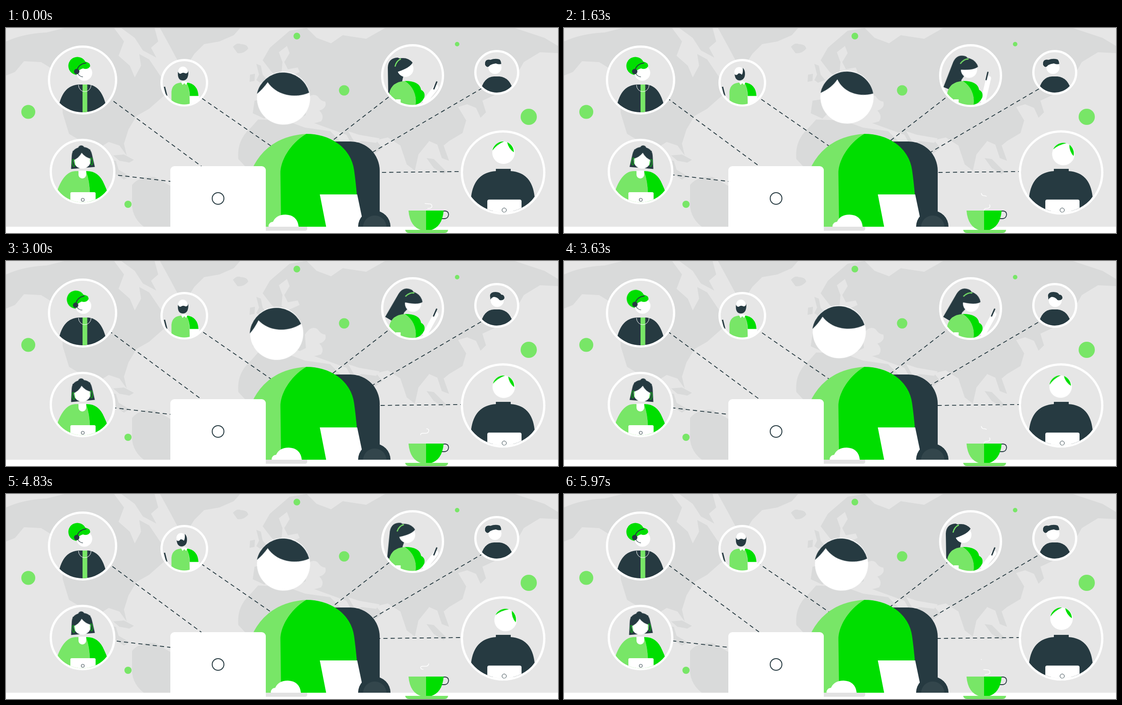
Recreate the animation shown at these times as an HTML page. Size 1226 by 457 pixels, loop 6010 ms.

```html
<!DOCTYPE html>
<html lang="en">
<head>
<meta charset="utf-8">
<title>Remote team</title>
<style>
html, body { margin: 0; width: 100%; height: 100%; overflow: hidden; background: #e6e6e6; }
svg { display: block; width: 100vw; height: 100vh; }
.dark { fill: #263a41; }
.green { fill: #00de00; }
.light { fill: #78e667; }
.white { fill: #fff; }
.land { fill: #d9dada; }
.sea { fill: #e6e6e6; }
.line { fill: none; stroke: #263a41; }
.disc { fill: #e6e6e6; stroke: #fff; stroke-width: 5; }

.anim, .links path, .steam { animation: 6.01s ease-in-out infinite; }

.links path {
  fill: none; stroke: #263a41; stroke-width: 1.8;
  stroke-dasharray: 9.3 6.8;
  animation-name: flow; animation-timing-function: linear;
}
@keyframes flow {
  from { stroke-dashoffset: var(--o); }
  to { stroke-dashoffset: calc(var(--o) - 284.3px); }
}
.steam {
  fill: none; stroke: #fff; stroke-width: 1.5;
  stroke-dasharray: 31 51;
  animation-name: rise; animation-duration: 2.00333s; animation-timing-function: linear;
}
@keyframes rise {
  from { stroke-dashoffset: -6px; }
  to { stroke-dashoffset: -88px; }
}

.boss { transform-origin: 640px 251px; animation-name: boss; }
@keyframes boss {
  0%, 4.2%, 64%, 100% { transform: rotate(-14deg); }
  12.5%, 22.5% { transform: rotate(0deg); }
  35%, 55% { transform: rotate(-23.4deg); }
}
.bossHair { animation-name: bossHair; }
@keyframes bossHair {
  0%, 4.2%, 35%, 100% { d: path("M585 130A59.5 59.5 0 0 1 698.2 155.2C668 161 628 147 614.5 110.6Q600 123 585 130Z"); }
  12.5%, 22.5% { d: path("M582 140A59.5 59.5 0 0 1 699 151C668 156 636 142 627 112Q612 132 582 140Z"); }
}
.hand { animation-name: hand; }
@keyframes hand {
  0%, 3%, 92%, 100% { transform: translate(0, 0); }
  12.5%, 24% { transform: translate(15px, 0); }
  34%, 65% { transform: translate(7px, 0); }
  75%, 82% { transform: translate(5px, 0); }
}

.agent { transform-origin: 175px 128px; animation-name: agent; }
@keyframes agent {
  0%, 2%, 21%, 32%, 71%, 85%, 94%, 100% { transform: rotate(0deg); }
  9%, 14.5% { transform: rotate(-4deg); }
  39%, 51.5% { transform: rotate(-4.5deg); }
  58%, 64% { transform: rotate(1deg); }
  89.5% { transform: rotate(-4deg); }
}
.bob { transform-origin: 171.5px 318px; animation-name: bob; }
@keyframes bob {
  0%, 5%, 76.5%, 100% { transform: rotate(-5deg); }
  12.5%, 29% { transform: rotate(5deg); }
  37.5%, 48% { transform: rotate(-6.5deg); }
  56.5%, 68% { transform: rotate(5deg); }
}

.skull { animation-name: skull; }
@keyframes skull {
  0%, 19%, 51.5%, 68%, 93%, 100% { transform: translate(0, 0); }
  25%, 45%, 75%, 86.5% { transform: translate(-4px, 1px); }
}
.beard { animation-name: beard; }
@keyframes beard {
  0%, 19%, 51.5%, 68%, 93%, 100% {
    d: path("M382 97Q380 117 393 117Q406 117 405 95Q404 102 398 101Q393 98 388 102Q383 102 382 97Z");
  }
  25%, 45%, 75%, 86.5% {
    d: path("M379 103Q380 117 391 117Q402 115 402 102Q402 93 397 89Q398 100 395 104Q388 98 385 104Q381 106 379 103Z");
  }
}

.caller { transform-origin: 888px 124px; animation-name: caller; }
@keyframes caller {
  0%, 1.7%, 88.2%, 100% { transform: rotate(0deg); }
  13.3%, 26.6% { transform: rotate(22deg); }
  31.6% { transform: rotate(29deg); }
  39% { transform: rotate(25deg); }
  42.6%, 64% { transform: rotate(31deg); }
}
.phone { transform-origin: 953.5px 128px; animation-name: phone; }
@keyframes phone {
  0%, 2%, 78%, 100% { transform: translate(0, 0) rotate(22deg); }
  12.5%, 27% { transform: translate(-14px, -21px) rotate(13deg); }
  38% { transform: translate(-12.5px, -20.5px) rotate(15deg); }
  48%, 65% { transform: translate(-.5px, -13px) rotate(24deg); }
}
.arm { fill: none; stroke: #fff; stroke-width: 11; stroke-linecap: round; animation-name: arm; }
@keyframes arm {
  0%, 2%, 78%, 100% { d: path("M931 163L955 132"); }
  12.5%, 38% { d: path("M931 163L943 112"); }
  48%, 65% { d: path("M931 163L955 119"); }
}

.buddy { animation-name: buddy; }
@keyframes buddy {
  0%, 11.6%, 26.6%, 36.6%, 71.5%, 100% { transform: translate(0, 0); }
  17.5%, 21.6%, 48%, 61.5% { transform: translate(5px, 0); }
}
.quiff { animation-name: quiff; }
@keyframes quiff {
  0%, 11.6%, 26.6%, 36.6%, 71.5%, 100% {
    d: path("M1064 77Q1066 69 1076 71Q1086 67 1096 70Q1099 72 1100 80Q1094 82 1088 79Q1080 80 1075 83Q1069 91 1064 82Z");
  }
  17.5%, 21.6%, 48%, 61.5% {
    d: path("M1075 77Q1076 69 1087 69Q1097 69 1100 75Q1107 75 1107 83Q1104 89 1096 87Q1091 80 1083 80Q1078 82 1076 86Z");
  }
}

.senior { transform-origin: 1105px 278px; animation-name: senior; }
@keyframes senior {
  0%, 1%, 94%, 100% { transform: translate(0, 0) rotate(0deg); }
  10%, 21.6% { transform: translate(-9px, 4px) rotate(-11deg); }
  28.3%, 43% { transform: translate(5px, 3px) rotate(15deg); }
  55%, 64% { transform: translate(-2px, 2px) rotate(-2deg); }
  72.4%, 74.5% { transform: translate(8px, 3px) rotate(18deg); }
  81% { transform: translate(4.5px, 3px) rotate(15deg); }
}
</style>
</head>
<body>
<svg viewBox="0 0 1226 457" preserveAspectRatio="none">
  <defs>
    <clipPath id="c1"><circle cx="170" cy="116" r="72"/></clipPath>
    <clipPath id="c2"><circle cx="396" cy="122" r="48.5"/></clipPath>
    <clipPath id="c3"><circle cx="903" cy="106" r="65.5"/></clipPath>
    <clipPath id="c4"><circle cx="1090" cy="99" r="45"/></clipPath>
    <clipPath id="c5"><circle cx="170" cy="320" r="68.5"/></clipPath>
    <clipPath id="c6"><circle cx="1104" cy="322" r="89"/></clipPath>
  </defs>
  <rect class="sea" width="1226" height="457"/>

  <!-- world map -->
  <g class="land">
    <path d="M0 30Q40 12 90 10L130 0H240L262 30L250 62L275 84L286 110L300 84L296 58L318 70L345 110L352 150L318 180L290 196L272 226L262 258L268 284L252 262L228 254L206 268L214 294L244 296L250 316L274 330L262 338L226 314L186 290L160 248L140 236L126 190L124 140L104 92L78 76L40 74L20 98L0 106Z"/>
    <path d="M256 0H330L338 30L322 44L334 66L304 50L286 22Z"/>
    <path d="M342 0H520L506 16L474 30L440 36L418 58L402 84L384 78L366 44Z"/>
    <path d="M504 42Q512 32 522 36Q536 36 538 46Q528 58 514 56Z"/>
    <path d="M556 80L566 84L570 104L580 116L564 122L556 116L562 104ZM542 104L553 102L552 118L541 120Z"/>
    <path d="M280 350Q296 330 330 332L372 356V443H306Q276 420 280 380Z"/>
    <path d="M516 292Q512 250 544 222L560 204L620 206L664 222L720 230L752 262L790 290L770 330L740 443H640L610 330L540 318Z"/>
    <path d="M548 190L552 162L578 158L570 136L596 126L606 112L590 98L570 72L586 44L630 6L668 0L690 22L722 34L748 16L800 24L842 0H1130L1196 22L1226 40V56L1186 54L1150 76L1132 108L1108 132L1084 150L1058 162L1066 188L1054 200L1044 178L1024 170L1004 176L1022 206L1014 234L984 252L972 262L984 296L968 290L958 260L940 252L916 282L908 318L890 304L876 262L848 244L822 250L836 268L806 290L782 284L756 238L712 222L690 214L640 196L616 176L592 184L574 202Z"/>
    <path d="M934 290L950 292L978 320L972 326L950 312ZM1030 270L1042 278L1040 300L1028 290ZM238 284L262 282L284 294L274 300L252 296Z"/>
  </g>
  <g class="sea">
    <path d="M606 54L624 40L630 56L618 76L626 92L648 88L652 98L626 110L612 100L614 76Z"/>
    <path d="M664 164Q678 142 692 152Q700 164 709 164Q714 178 696 184Q708 196 700 208Q676 216 652 214L642 206L666 194Z"/>
    <path d="M760 230L784 238L830 246L822 256L790 252L776 258Z"/>
  </g>

  <g class="light">
    <circle cx="49.500" cy="187" r="15.500"/>
    <circle cx="271" cy="393" r="8"/>
    <circle cx="646" cy="18" r="7.500"/>
    <circle cx="751" cy="139" r="11.500"/>
    <circle cx="1002" cy="36" r="5"/>
    <circle cx="1161" cy="198" r="18"/>
  </g>

  <g class="links">
    <path style="--o:-9.7px" d="M435 309L233 159"/>
    <path style="--o:-1.5px" d="M590 264L434 156"/>
    <path style="--o:-3.8px" d="M725 251L851 153"/>
    <path style="--o:.5px" d="M814 277L1056 135"/>
    <path style="--o:-5px" d="M830 322L1010 320"/>
    <path style="--o:-11.900px" d="M366 342L242 327.500"/>
  </g>

  <!-- headset agent -->
  <circle class="disc" cx="170" cy="116" r="74.500"/>
  <g clip-path="url(#c1)">
    <path class="dark" d="M115 188Q122 126 164 126H182Q216 128 225 188Z"/>
    <path class="light" d="M170 126H180.500V190H170Z"/>
    <path d="M161 127A14 15 0 0 0 189 127" fill="none" stroke="#fff"/>
    <g class="anim agent">
      <circle class="green" cx="158.500" cy="84.500" r="20"/>
      <circle class="white" cx="174" cy="100" r="17.500"/>
      <path class="green" d="M158 92Q160 76 176 75Q187 77 187 85Q182 94 171 90Q164 92 158 98Z"/>
      <path class="line" stroke-width="2" d="M157 97Q160 80 178 78"/>
      <path class="line" stroke-width="1.200" d="M159 101Q164 109 171 109"/>
      <circle class="dark" cx="157" cy="97" r="6"/>
    </g>
  </g>

  <!-- bearded man -->
  <circle class="disc" cx="396" cy="122" r="50.500"/>
  <g clip-path="url(#c2)">
    <path class="light" d="M367.500 175V142Q369 122 392 121.500H402Q408 132 408 175Z"/>
    <path class="green" d="M401 121.500Q426 124 427.500 152H408Q408 134 401 121.500Z"/>
    <path class="white" d="M389 121L396 118L403 121L400 127L396 123L392 127ZM408 151.500H430L426 170H408Z"/>
    <path class="line" stroke-width="3" d="M352 131L357 151"/>
    <g class="anim skull"><ellipse class="white" cx="393" cy="97" rx="10.500" ry="11"/></g>
    <path class="dark anim beard" d="M382 97Q380 117 393 117Q406 117 405 95Q404 102 398 101Q393 98 388 102Q383 102 382 97Z"/>
  </g>

  <!-- woman with phone -->
  <circle class="disc" cx="903" cy="106" r="67.500"/>
  <g clip-path="url(#c3)">
    <g class="anim caller">
      <path class="dark" d="M849 148L848 88Q849 67 870 66L890 75L880 118Q885 138 882 148Z"/>
      <circle class="white" cx="887" cy="91" r="18"/>
      <path class="dark" d="M862 72Q888 60 903 77Q898 88 872 97L864 100Z"/>
      <path d="M864 86Q867 73 877 69" fill="none" stroke="#78e667" stroke-width="2.500"/>
    </g>
    <path class="arm anim" d="M931 163L955 132"/>
    <g class="anim phone"><path class="line" stroke-width="3" d="M953.500 118.500V137.500"/></g>
    <path class="light" d="M851 178V146Q856 119 888 118Q912 130 911 178Z"/>
    <path class="green" d="M886 118Q919 118 922 138Q932 143 929 155Q923 168 910 171Q913 136 886 118Z"/>
    <path class="white" d="M866 159H876.500V170H866Z"/>
  </g>

  <!-- man with quiff -->
  <circle class="disc" cx="1090" cy="99" r="47.500"/>
  <g clip-path="url(#c4)">
    <path class="dark" d="M1054 142Q1060 109 1084 108H1096Q1120 110 1127 142V150H1054Z"/>
    <g class="anim buddy"><circle class="white" cx="1086" cy="88" r="14.500"/></g>
    <path class="dark anim quiff" d="M1064 77Q1066 69 1076 71Q1086 67 1096 70Q1099 72 1100 80Q1094 82 1088 79Q1080 80 1075 83Q1069 91 1064 82Z"/>
  </g>

  <!-- woman with bob -->
  <circle class="disc" cx="170" cy="320" r="70.500"/>
  <g clip-path="url(#c5)">
    <path class="light" d="M106 390Q122 320 154 319H179Q188 350 185 392Z"/>
    <path class="green" d="M178 319Q206 318 218 348Q228 368 230 392H185Q189 350 178 319Z"/>
    <g class="anim bob">
      <circle class="dark" cx="171.500" cy="268.500" r="7"/>
      <path class="dark" d="M145 312L149 283Q151 266 171.500 265Q192 266 194 283L198 312Z"/>
      <circle class="white" cx="171.500" cy="294.500" r="19"/>
      <path class="dark" d="M150 294Q165 289 171.500 278Q178 289 193 294L191 272H152Z"/>
      <g fill="none" stroke="#00de00" stroke-width="1.200">
        <ellipse cx="151.500" cy="299" rx="2.500" ry="8"/>
        <ellipse cx="191.500" cy="299" rx="2.500" ry="8"/>
      </g>
    </g>
    <path class="white" d="M161 318H178V327A8.500 8.500 0 0 1 161 327Z"/>
    <rect class="white" x="143" y="366" width="56" height="34" rx="3"/>
    <circle class="line" cx="170.500" cy="383" r="3.500"/>
  </g>

  <!-- senior man -->
  <circle class="disc" cx="1104" cy="322" r="91.500"/>
  <g clip-path="url(#c6)">
    <path class="dark" d="M1033 376Q1040 322 1088 319V314H1121V319Q1168 322 1174 376Q1160 398 1140 408H1070Q1044 398 1033 376Z"/>
    <g class="anim senior">
      <circle class="white" cx="1105" cy="278" r="25"/>
      <path class="green" d="M1080.500 273A25 25 0 0 1 1106 253Q1090 260 1080.500 273ZM1113 254.500A25 25 0 0 1 1128 277Q1116 269 1113 254.500Z"/>
    </g>
    <rect class="white" x="1069" y="382.500" width="76" height="40" rx="4"/>
    <circle class="line" cx="1106.500" cy="406" r="4.800"/>
  </g>

  <!-- desk scene -->
  <path class="dark" d="M700 253H765A65 65 0 0 1 830 318V443H700Z"/>
  <path class="light" d="M540 330Q572 242 667 236L690 260L630 443H560Z"/>
  <path class="green" d="M667 236C722 236 766 268 773 316Q777 344 780 380V443H611L609.500 325C609 292 636 254 667 236Z"/>
  <path class="white" d="M697 371H780L795 443H711Z"/>
  <circle class="dark" cx="818" cy="443" r="36"/>
  <circle cx="819" cy="444" r="26" fill="#33464c"/>
  <g class="anim boss">
    <circle class="white" cx="640" cy="153.500" r="59"/>
    <path class="dark anim bossHair" d="M585 130A59.500 59.500 0 0 1 698.200 155.200C668 161 628 147 614.500 110.600Q600 123 585 130Z"/>
  </g>
  <rect class="white" y="443" width="1226" height="14"/>
  <path d="M577 443H669V447Q669 452 664 452H577Z" fill="#e2e2e2"/>
  <g class="anim hand">
    <path class="white" d="M583 443Q583 433 593 432Q600 416 621 416Q647 417 650 443Z"/>
  </g>
  <rect class="white" x="365" y="308" width="212" height="149" rx="9"/>
  <circle class="line" cx="471" cy="380" r="13" stroke-width="2"/>

  <!-- coffee -->
  <path class="steam" pathLength="88" d="M933 407Q933 402 939 402Q946 402 946 397Q946 392 939 392L928 391Q921 391 921 387Q921 384 926 384H932Q939 384 939 377Q938 374 934 374Q927 374 927 368"/>
  <path class="line" stroke-width="1.800" d="M971 408H976Q983 409 983 416Q982 424 975 425H967"/>
  <path class="light" d="M894 407H933V451H924Q897 444 894 407Z"/>
  <path class="green" d="M933 407H972Q969 444 942 451H933Z"/>
  <path class="light" d="M886.500 450H982Q981 457 974 457H895Q888 457 886.500 450Z"/>
</svg>
</body>
</html>
```
